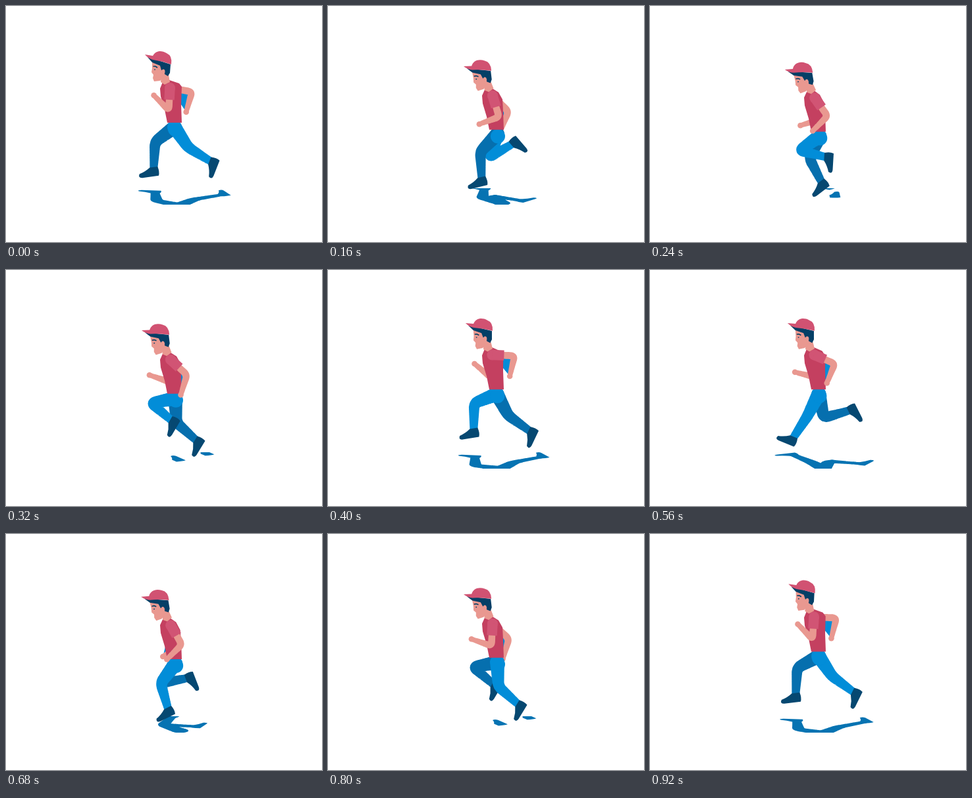
Write an HTML page with a canvas that moves like this. It is 480 px wide and 360 px high and loops after 0.96 s.

```html
<!DOCTYPE html>
<html lang="en">
<head>
<meta charset="utf-8">
<title>Runner</title>
<style>
html, body { margin: 0; width: 100%; height: 100%; overflow: hidden; background: #fff; }
canvas { display: block; }
</style>
</head>
<body>
<canvas id="stage" width="480" height="360"></canvas>
<script>
const ctx = document.getElementById('stage').getContext('2d');
const LOOP = 960, STRIDE = LOOP / 2, STEP = 40;
const COLOR = {
  shirt: '#c44060', sleeve: '#d15474', cap: '#d15272', skin: '#e99890',
  hair: '#053f66', light: '#028dd8', dark: '#066fae', shoe: '#064871', shadow: '#0673b2'
};

// Joint angles in degrees, evenly spaced over one loop: 0 hangs down, positive swings forward.
// The opposite limb runs the same cycle half a loop later.
const CYCLE = {
  thigh: [-34, -12, 19, 54, 79, 68, 53, 27, 44, 24, -3, -28],
  shin: [-58, -106, -120, -76, -49, 1, 3, 33, -3, -27, -48, -54],
  upperArm: [3, -3, -17, -35, -47, -88, -80, -67, -45, -15, 3, 4],
  forearm: [135, 104, 70, 45, 17, 13, 16, 22, 22, 73, 109, 130]
};

const mix = (a, b, k) => a + (b - a) * k;
const between = (p, q, k) => [mix(p[0], q[0], k), mix(p[1], q[1], k)];
const rad = degrees => degrees * Math.PI / 180;

// Cyclic Catmull-Rom interpolation
function sample(values, t) {
  const n = values.length, pos = (t % LOOP) / LOOP * n, i = Math.floor(pos), s = pos - i;
  const [p, a, b, q] = [-1, 0, 1, 2].map(k => values[(i + k + n) % n]);
  const m0 = (b - p) / 2, m1 = (q - a) / 2, d = b - a;
  return a + s * (m0 + s * (3 * d - 2 * m0 - m1 + s * (m0 + m1 - 2 * d)));
}

function swing([x, y], angle, length) {
  return [x - Math.sin(rad(angle)) * length, y + Math.cos(rad(angle)) * length];
}

function legPose(hip, t) {
  const shin = sample(CYCLE.shin, t);
  const knee = swing(hip, sample(CYCLE.thigh, t), 37);
  return { hip, knee, ankle: swing(knee, shin, 40), shin };
}

function armPose(shoulder, t) {
  const angle = sample(CYCLE.upperArm, t);
  const elbow = swing(shoulder, angle, 34);
  return { shoulder, elbow, hand: swing(elbow, sample(CYCLE.forearm, t), 32), angle };
}

function polygon(points, color) {
  ctx.fillStyle = color;
  ctx.beginPath();
  for (let i = 0; i < points.length; i += 2) ctx.lineTo(points[i], points[i + 1]);
  ctx.fill();
}

function line(points, width, color) {
  ctx.strokeStyle = color;
  ctx.lineWidth = width;
  ctx.beginPath();
  for (let i = 0; i < points.length; i += 2) ctx.lineTo(points[i], points[i + 1]);
  ctx.stroke();
}

function ellipse([x, y], rx, ry, color) {
  ctx.fillStyle = color;
  ctx.beginPath();
  ctx.ellipse(x, y, rx, ry, 0, 0, Math.PI * 2);
  ctx.fill();
}

// Tapered limb with a softly rounded middle joint
function limb(a, b, c, radii, color) {
  const soft = 0.2, steps = 60;
  const start = between(b, a, soft), end = between(b, c, soft);
  ctx.fillStyle = color;
  ctx.beginPath();
  for (let i = 0; i <= steps; i++) {
    const u = i / steps * 2;
    let p;
    if (u < 1 - soft) p = between(a, b, u);
    else if (u > 1 + soft) p = between(b, c, u - 1);
    else {
      const k = (u - 1 + soft) / (2 * soft);
      p = between(between(start, b, k), between(b, end, k), k);
    }
    const r = u < 1 ? mix(radii[0], radii[1], u) : mix(radii[1], radii[2], u - 1);
    ctx.moveTo(p[0] + r, p[1]);
    ctx.arc(p[0], p[1], r, 0, Math.PI * 2);
  }
  ctx.fill();
}

function shoe({ ankle, shin }, color) {
  ctx.save();
  ctx.translate(...ankle);
  ctx.rotate(rad(shin - 6));
  ctx.fillStyle = color;
  ctx.beginPath();
  ctx.moveTo(6, -2);
  ctx.quadraticCurveTo(9, 6, 7, 12);
  ctx.lineTo(-18, 14);
  ctx.quadraticCurveTo(-25, 14, -22, 8);
  ctx.quadraticCurveTo(-13, 5, -6, -1);
  ctx.fill();
  ctx.restore();
}

function leg(pose, color, shoeColor) {
  limb(pose.hip, pose.knee, pose.ankle, [11, 8.5, 6], color);
  shoe(pose, shoeColor);
}

function arm({ shoulder, elbow, hand }) {
  limb(shoulder, elbow, hand, [5, 5.5, 3.5], COLOR.skin);
  ellipse(hand, 4.3, 4.3, COLOR.skin);
}

// Blue seen through the crook of an arm that is drawn back
function armGap({ shoulder, elbow, hand, angle }) {
  if (angle < -20) polygon([...shoulder, ...elbow, ...hand], COLOR.light);
}

function sleeve({ shoulder, elbow }) {
  ellipse(shoulder, 8, 8, COLOR.sleeve);
  line([...shoulder, ...between(shoulder, elbow, 0.53)], 15.5, COLOR.sleeve);
}

function torso(u) {
  const low = 11 * u;
  polygon([
    238, 116 + 12 * u, 248, 113 + 12 * u, 263 - 4 * u, 118 + 14 * u, 267 - 2 * u, 123 + 20 * u,
    266, 150 + low, 267, 178 + low, 245, 178 + low, 241, 158 + low, 235, 138 + low, 234, 126 + low
  ], COLOR.shirt);
}

function head(u) {
  ctx.save();
  ctx.translate(236 - 2 * u, 92 + 13 * u);
  ctx.rotate(-0.2 * u);
  ctx.translate(-236, -92);
  polygon([236,103, 247,105, 249,116, 241,120, 235,116], COLOR.skin);
  polygon([222,84, 238,88, 243,99, 240,108, 234,114, 225,115, 223,110, 224,105, 221,101, 222,95], COLOR.skin);
  polygon([215,78, 222,80, 250,89, 249,102, 246,107, 241,104, 240,97, 236,98, 234,91, 222,86], COLOR.hair);
  ellipse([239, 100], 2.5, 3.5, COLOR.skin);
  line([223.5,92, 227,92, 230,94], 1.6, COLOR.hair);
  ellipse([226, 97], 1, 0.8, COLOR.hair);
  ctx.fillStyle = COLOR.cap;
  ctx.beginPath();
  ctx.moveTo(211, 74);
  ctx.lineTo(223, 76);
  ctx.bezierCurveTo(227, 68, 236, 67, 244, 72);
  ctx.quadraticCurveTo(253, 76, 251, 89);
  ctx.quadraticCurveTo(237, 84, 223, 82);
  ctx.quadraticCurveTo(216, 80, 211, 74);
  ctx.fill();
  ctx.restore();
}

// The legs mirrored and flattened onto the ground; only the shoes show while the legs pass
function shadow(legs, t) {
  const phase = t % STRIDE, passing = phase > 200 && phase < 380;
  ctx.save();
  ctx.beginPath();
  ctx.rect(0, 278, 480, 25);
  ctx.clip();
  ctx.transform(1.15, 0, 0, -0.3, -31.5, 359.4);
  for (const pose of legs) {
    if (passing) shoe(pose, COLOR.shadow);
    else leg(pose, COLOR.shadow, COLOR.shadow);
  }
  ctx.restore();
}

function draw(t) {
  ctx.fillStyle = '#fff';
  ctx.fillRect(0, 0, 480, 360);

  // How far the body sinks between two leaps
  const u = 1.25 * Math.sin(Math.PI * (t % STRIDE) / STRIDE) ** 1.7;
  const hip = [256 + u, 185 + 11 * u];
  const shoulder = [249 + u, 125 + 12 * u];
  const light = legPose(hip, t), dark = legPose(hip, t + STRIDE);
  const near = armPose(shoulder, t), far = armPose(shoulder, t + STRIDE);

  shadow([light, dark], t);
  armGap(far);
  arm(far);

  const drawLight = () => leg(light, COLOR.light, COLOR.shoe);
  const drawDark = () => leg(dark, COLOR.dark, COLOR.shoe);
  const kickedBack = light.shin < -108;
  const order = kickedBack ? [drawLight, drawDark] : [drawDark, drawLight];
  order.forEach(paint => paint());
  ellipse([hip[0] + 1, hip[1] + 3], 11, 11, COLOR.light);

  armGap(near);
  torso(u);
  head(u);
  arm(near);
  sleeve(near);
}

function tick() {
  draw(Math.floor(performance.now() % LOOP / STEP) * STEP);
  requestAnimationFrame(tick);
}
tick();
</script>
</body>
</html>
```
